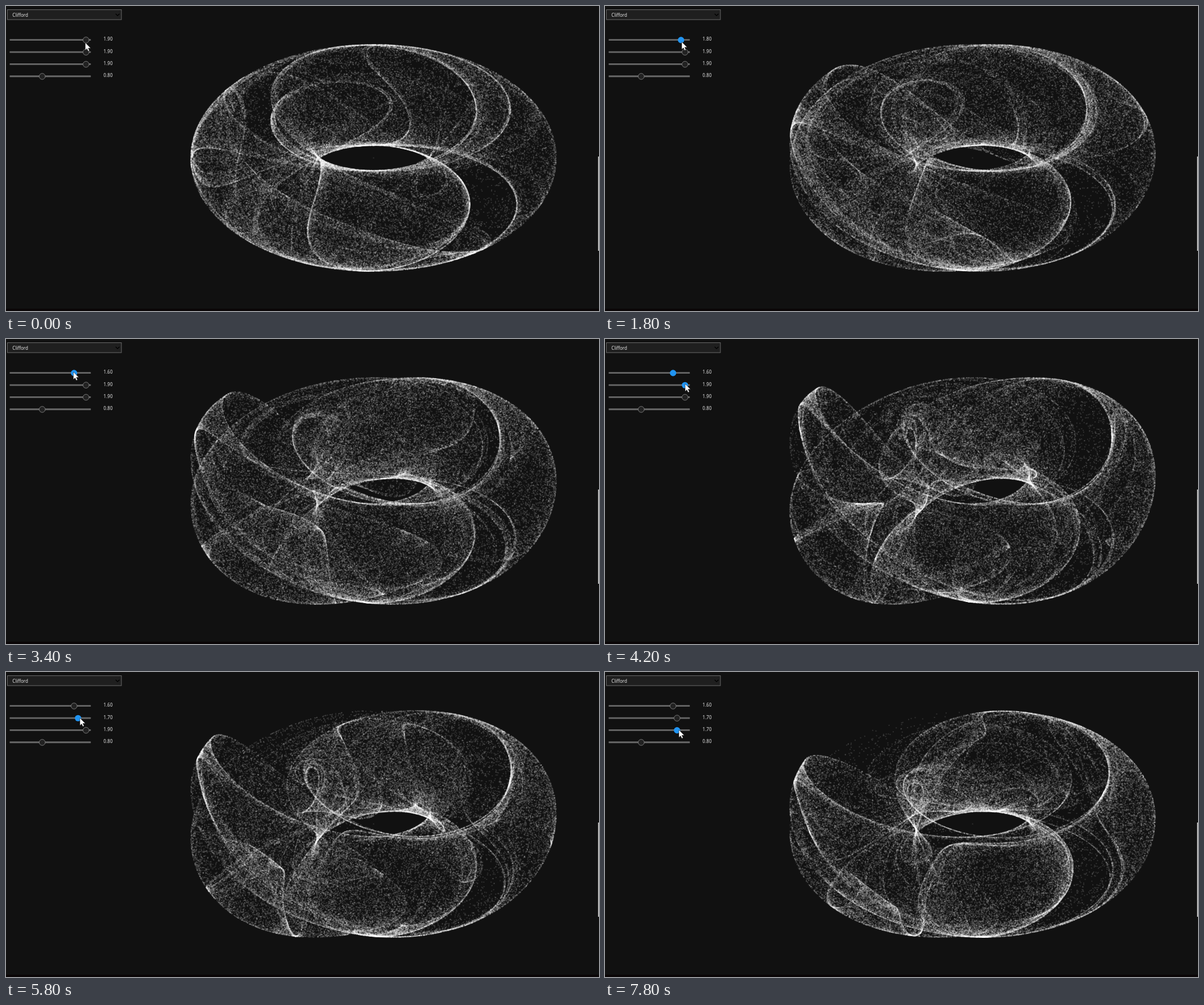
Write an HTML page with a canvas that moves like this. It is 1043 px wide and 537 px high and loops after 8000 ms.

```html
<!DOCTYPE html>
<html lang="en">
<head>
<meta charset="utf-8">
<title>Clifford attractor</title>
<style>
  html, body { margin: 0; width: 100%; height: 100%; overflow: hidden; background: #111; }
  canvas, svg { position: absolute; left: 0; top: 0; width: 1043px; height: 537px; }
  text { font: 8px "Noto Sans", "Open Sans", sans-serif; fill: #e4e4e4; }
</style>
</head>
<body>
<canvas id="plot" width="1043" height="537"></canvas>
<svg id="ui" viewBox="0 0 1043 537">
  <rect y="533" width="1043" height="4" fill="#0a0607"/>
  <rect x="1041.5" y="265" width="1.5" height="166" fill="#ddd"/>
  <rect x="2.5" y="6.5" width="200.5" height="17.5" fill="#1f1f1f" stroke="#6a6a6a"/>
  <text x="11.3" y="18.7">Clifford</text>
  <path d="M192.8 13.8l3.4 3.2 3.4-3.2" fill="none" stroke="#000" stroke-width="1.4"/>
  <g id="sliders"></g>
  <path id="cursor" d="M0 0V13.2L3 10.5 5.1 15 7.3 14 5.2 9.6H9.5Z"
        fill="#fff" stroke="#111" stroke-width=".5"/>
</svg>
<script>
const LOOP = 8000, TICK = 200;
const W = 1043, H = 537;
const CENTER_X = 646.5, CENTER_Y = 267.5, SCALE = 110.8;
const POINTS = 75000, DOT = 2, ALPHA = 0.13;

const START = [1.9, 1.9, 1.9, 0.8];
const REST = [133, 63];
const GRAB_LEAD = 400;   // the pointer reaches a knob this long before its first step
const TRAVEL = 700;      // pointer flight from one slider to the next
const PLOT_LAG = 1200;   // the plot follows the values this much later

// One entry per dragged slider: each step lowers its value by 0.1.
const drags = [
  { steps: [600, 2200, 2800], grip: [141, 65], end: [118.5, 58] },
  { steps: [4600, 5200], grip: [141, 79], end: [130, 81] },
  { steps: [7000, 7400], grip: [142, 103], end: [130, 102] }
];

const trackY = i => 59.7 + 21.35 * i;
const knobX = value => 7.7 + 70 * value;
const mix = (a, b, f) => a.map((v, i) => v + (b[i] - v) * f);
const clamp = f => Math.min(1, Math.max(0, f));
const smooth = f => f * f * (3 - 2 * f);

const grabTime = drag => drag.steps[0] - GRAB_LEAD;
const stepsDone = (drag, t) => drag.steps.filter(s => s <= t).length;

function valuesAt(t) {
  return START.map((v, i) => drags[i] ? v - 0.1 * stepsDone(drags[i], t) : v);
}

// A knob stays lit until the next slider starts to move.
function isActive(i, t) {
  const next = drags[i + 1];
  return !!drags[i] && t >= grabTime(drags[i]) && !(next && t >= next.steps[0]);
}

function cursorAt(t) {
  return drags.reduce((from, drag) => {
    const flight = clamp((t - grabTime(drag)) / TRAVEL + 1);
    const pulled = (stepsDone(drag, t) / drag.steps.length) ** 1.2;
    const held = mix(drag.grip, drag.end, pulled);
    return mix(from, held, smooth(flight));
  }, REST);
}

function attractor([a, b, c, d]) {
  const image = new ImageData(W, H);
  const light = new Float32Array(W * H);
  const half = DOT / 2;
  const cover = (cell, mid) => Math.min(cell + 1, mid + half) - Math.max(cell, mid - half);
  let x = 0, y = 0;
  for (let i = 0; i < POINTS; i++) {
    const px = CENTER_X + x * SCALE, py = CENTER_Y + y * SCALE;
    for (let v = Math.floor(py - half); v < py + half; v++) {
      for (let u = Math.floor(px - half); u < px + half; u++) {
        const k = v * W + u;
        light[k] += (1 - light[k]) * ALPHA * cover(u, px) * cover(v, py);
      }
    }
    [x, y] = [
      Math.sin(a * y) + c * Math.cos(a * x),
      Math.sin(b * x) + d * Math.cos(b * y)
    ];
  }
  image.data.fill(255);
  light.forEach((l, k) => { image.data[k * 4 + 3] = l * 255; });
  return image;
}

const plots = new Map();
function plotFor(values) {
  const key = values.join();
  if (!plots.has(key)) plots.set(key, attractor(values));
  return plots.get(key);
}

function add(parent, tag, attrs) {
  const el = document.createElementNS("http://www.w3.org/2000/svg", tag);
  for (const name in attrs) el.setAttribute(name, attrs[name]);
  return parent.appendChild(el);
}

const sliderGroup = document.getElementById("sliders");
const sliders = START.map((_, i) => {
  const y = trackY(i);
  add(sliderGroup, "rect", { x: 6.5, y: y - 1.4, width: 142.7, height: 2.8, rx: 0.5, fill: "#686868" });
  return {
    knob: add(sliderGroup, "circle", { cy: y + 0.2 }),
    label: add(sliderGroup, "text", { x: 171.6, y: y + 1.7 })
  };
});

const context = document.getElementById("plot").getContext("2d");
const cursor = document.getElementById("cursor");
let shown;

function render(time) {
  const t = Math.floor(time / TICK) * TICK;
  const plot = plotFor(valuesAt(t - PLOT_LAG));
  if (plot !== shown) context.putImageData(shown = plot, 0, 0);

  const values = valuesAt(t);
  sliders.forEach(({ knob, label }, i) => {
    const active = isActive(i, t);
    knob.setAttribute("cx", knobX(values[i]));
    knob.setAttribute("r", active ? 5.6 : 5.3);
    knob.setAttribute("fill", active ? "#2094f3" : "#222");
    knob.setAttribute("stroke", active ? "none" : "#777");
    label.textContent = values[i].toFixed(2);
  });
  cursor.setAttribute("transform", `translate(${cursorAt(t)})`);
}

// Prepare every plot up front so that no frame is late.
for (let t = 0; t < LOOP; t += TICK) plotFor(valuesAt(t - PLOT_LAG));

let origin;
function frame(now) {
  origin ??= now;
  render((now - origin) % LOOP);
  requestAnimationFrame(frame);
}
render(0);
requestAnimationFrame(frame);
</script>
</body>
</html>
```
